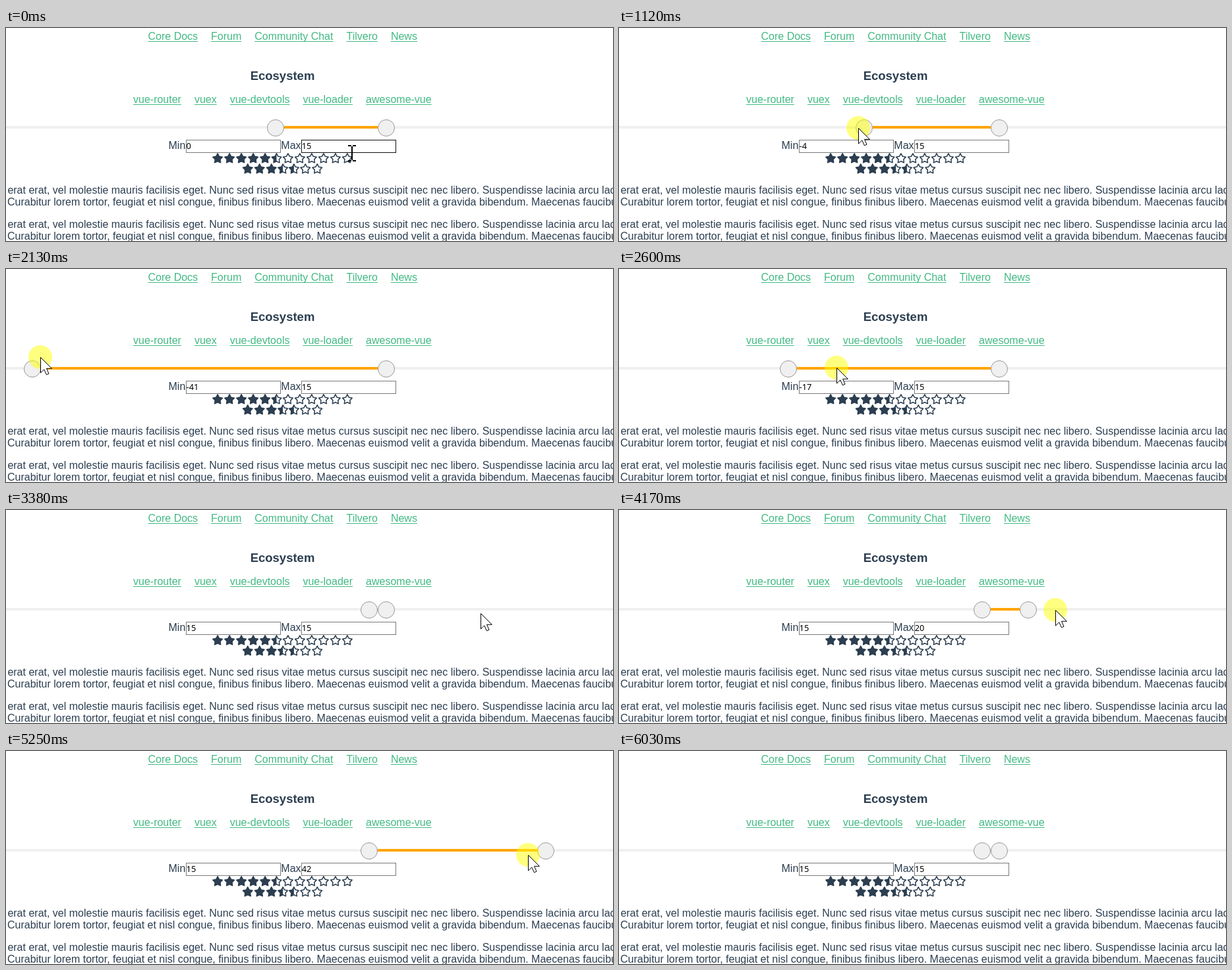
Animation of 921 by 324 pixels, one loop 6.57 s. Source, as an HTML page:

```html
<!DOCTYPE html>
<html lang="en">
<head>
<meta charset="utf-8">
<title>Range slider</title>
<style>
  html, body { margin: 0; width: 100%; height: 100%; overflow: hidden; background: #fff; }
  svg { display: block; }
  text { font: 16px "Liberation Sans", Arial, sans-serif; fill: #2c3e50; white-space: pre; }
  .link { fill: #42b983; }
  .title { font-size: 18.5px; font-weight: bold; text-anchor: middle; }
  .value { font: 12.8px "Noto Sans", "Open Sans", sans-serif; fill: #000; }
  .field { fill: #fff; stroke: #7a7a7a; }
  .handle { fill: #f0f0f0; stroke: #999; }
  .star { stroke: #2c3e50; stroke-width: 1.5; stroke-linejoin: round; fill: none; }
  .fill { fill: #2c3e50; }
</style>
</head>
<body>
<svg id="stage" width="921" height="324" viewBox="0 0 921 324">
  <text class="title" x="419.5" y="79">Ecosystem</text>
  <rect y="149" width="921" height="4" fill="#f0f0f0"/>
  <rect id="range" y="149" height="4" fill="orange"/>
  <circle id="minHandle" class="handle" cy="152" r="12.5"/>
  <circle id="maxHandle" class="handle" cy="152" r="12.5"/>
  <text x="246.5" y="184">Min</text>
  <rect class="field" x="273.5" y="170.5" width="143" height="19"/>
  <text id="minValue" class="value" x="273.6" y="184"></text>
  <text x="417.3" y="184">Max</text>
  <rect id="maxField" class="field" x="448.5" y="170.5" width="143" height="19"/>
  <text id="maxValue" class="value" x="448.8" y="184"></text>
  <g id="page"></g>
  <g id="cursor">
    <circle id="press" r="18" fill="#ff0" opacity=".5"/>
    <path id="arrow" d="M.5 .5V24L5.8 18.8 9.4 26.8 13 25.2 9.5 17.3H17.4Z" fill="#fff" stroke="#000"/>
    <path id="beam" d="M-6-11H-1M1-11H6M-6 12H-1M1 12H6M0-10V11" fill="none" stroke="#000" stroke-width="2"/>
  </g>
</svg>
<script>
const LOOP = 6570, STEP = 77.8;
const MIN_DRAG = [888, 3140], MAX_DRAG = [3922, 5705];
const $ = id => document.getElementById(id);

function add(tag, attrs, text = "") {
  const el = document.createElementNS("http://www.w3.org/2000/svg", tag);
  for (const k in attrs) el.setAttribute(k, attrs[k]);
  el.textContent = text;
  return $("page").appendChild(el);
}

function links(x, y, names) {
  for (const name of names) {
    const width = add("text", { class: "link", x, y }, name).getComputedTextLength();
    add("rect", { class: "link", x, y: y + 2, width, height: 1 });
    x += width + 20;
  }
}

const starPoints = Array.from({ length: 11 }, (_, i) => {
  const a = i * Math.PI / 5, r = i % 2 ? 4.1 : 7.7;
  return [r * Math.sin(a), -r * Math.cos(a)].map(n => n.toFixed(2)).join();
});

// Half stars take a little less room than the others
function stars(y, count, full, half) {
  let x = 419.5 - (18 * count - 1.25 * half) / 2;
  for (let i = 0; i < count; i++) {
    const isFull = i < full, isHalf = !isFull && i < full + half;
    const width = isHalf ? 16.75 : 18;
    const transform = `translate(${x + width / 2} ${y})`;
    add("polygon", { class: "star", points: starPoints.join(" "), transform });
    if (isFull || isHalf)
      add("polygon", { class: "fill", points: starPoints.slice(isFull ? 0 : 5).join(" "), transform });
    x += width;
  }
}

links(215.5, 18, ["Core Docs", "Forum", "Community Chat", "Tilvero", "News"]);
links(193, 114, ["vue-router", "vuex", "vue-devtools", "vue-loader", "awesome-vue"]);
stars(198.6, 12, 5, 1);
stars(214.6, 7, 3, 2);
for (const y of [252, 304]) {
  add("text", { x: 2.4, y }, "erat erat, vel molestie mauris facilisis eget. Nunc sed risus vitae metus cursus suscipit nec nec libero. Suspendisse lacinia arcu lacus");
  add("text", { x: 2, y: y + 18 }, "Curabitur lorem tortor, feugiat et nisl congue, finibus finibus libero. Maecenas euismod velit a gravida bibendum. Maecenas faucibus");
}

// Pointer path: time, x, y
const path = [
  [-46, 525, 190], [266, 388, 135], [500, 391, 137], [655, 409, 143], [888, 409, 143],
  [1043, 372, 149], [1121, 363, 152], [1588, 179, 142], [1666, 155, 140], [2040, 40, 133],
  [2522, 257, 147], [2600, 330, 150], [3066, 720, 157], [3378, 720, 157], [3611, 575, 162],
  [3922, 575, 162], [4233, 700, 150], [4544, 838, 157], [4622, 876, 159], [4800, 886, 161],
  [5250, 790, 158], [5712, 137, 143], [5945, 511, 255]
];

// Smooth curve through the path that never overshoots a key
function pointer(t, axis) {
  const last = path.length - 1;
  t = Math.min(Math.max(t, path[0][0]), path[last][0]);
  const rate = i => (path[i + 1][axis] - path[i][axis]) / (path[i + 1][0] - path[i][0]);
  const slope = i => {
    if (i === 0 || i === last) return 0;
    const a = rate(i - 1), b = rate(i);
    return a * b > 0 ? 2 * a * b / (a + b) : 0;
  };
  const i = Math.min(last - 1, path.findLastIndex(k => k[0] <= t));
  const a = path[i], b = path[i + 1], span = b[0] - a[0], u = (t - a[0]) / span, v = 1 - u;
  return Math.round(v * v * (1 + 2 * u) * a[axis] + u * u * (3 - 2 * u) * b[axis]
    + span * u * v * (v * slope(i) - u * slope(i + 1)));
}

// A dragged handle trails the pointer by one screen update
const trail = (t, [from, to]) => pointer(Math.min(Math.max(t - STEP, from), to), 1);
const during = (t, [from, to]) => t >= from - 5 && t < to;
const show = (id, on) => $(id).setAttribute("visibility", on ? "visible" : "hidden");
const value = x => Math.trunc(x / 8.95) + 0;

function draw(time) {
  const t = 888 + STEP * Math.floor((time - 870) / STEP);
  const min = Math.min(551, trail(t, MIN_DRAG));
  const max = Math.max(577, trail(t, MAX_DRAG));

  $("minHandle").setAttribute("cx", min);
  $("maxHandle").setAttribute("cx", max);
  $("range").setAttribute("x", min + 13);
  $("range").setAttribute("width", max - min - 26);
  $("minValue").textContent = value(min - 414);
  $("maxValue").textContent = value(max - 440);

  const typing = t < 100;
  $("maxField").style.stroke = typing ? "#111" : "";
  $("cursor").setAttribute("transform", `translate(${pointer(t, 1)} ${pointer(t, 2)})`);
  show("beam", typing);
  show("arrow", !typing && t < 6020);
  show("press", during(t, MIN_DRAG) || during(t, MAX_DRAG));
}

const start = performance.now();
function frame() {
  draw((performance.now() - start) % LOOP);
  requestAnimationFrame(frame);
}
frame();
</script>
</body>
</html>
```
